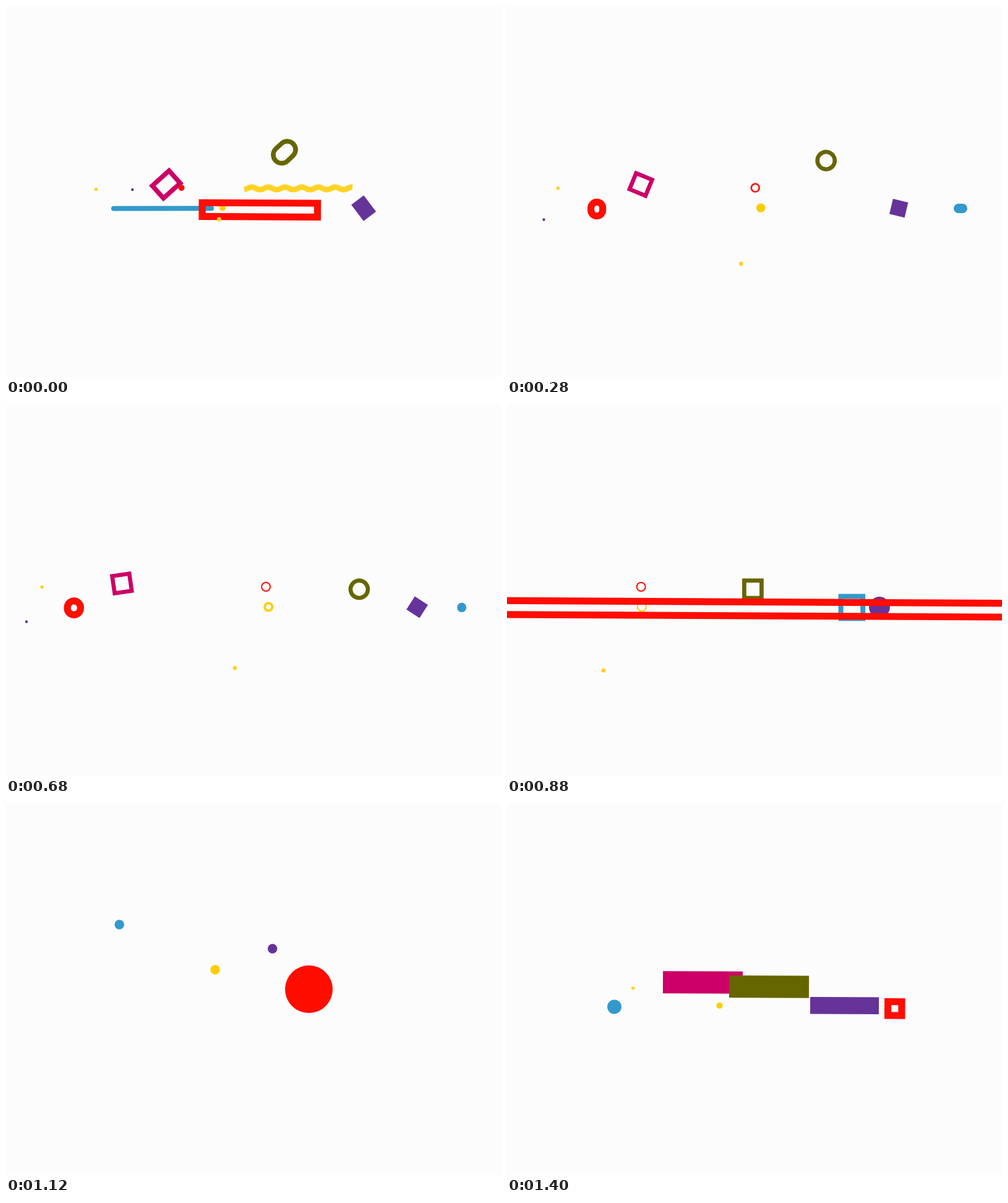
Recreate the animation shown at these times as an HTML page with a canvas. Size 800 px wide and 600 px high, loop 1440 ms.

```html
<!DOCTYPE html>
<html lang="en">
<head>
<meta charset="utf-8">
<title>Shape relay</title>
<style>
  html, body { margin: 0; width: 100%; height: 100%; overflow: hidden; background: #fcfcfc; }
  canvas { display: block; }
</style>
</head>
<body>
<canvas id="stage" width="800" height="600"></canvas>
<script>
const ctx = document.getElementById('stage').getContext('2d');
const RED = '#ff0d00', BLUE = '#3399cc', PURPLE = '#663399', OLIVE = '#666600',
      MAGENTA = '#cc0066', YELLOW = '#ffcc00', LEMON = '#ffd326';

// Each loop gathers (before 0), drifts apart (from 0) and sweeps away (from SWEEP to END).
const LOOP = 1440, STEP = 40, LEAD = 320, SWEEP = 680, END = LOOP - LEAD;
const SOLID = 99;

const mix = (a, b, p) => a + (b - a) * p;
const linear = (t, from, to) => Math.min(1, Math.max(0, (t - from) / (to - from)));
const ramp = (t, from, to) => { const p = linear(t, from, to); return p * p * (3 - 2 * p); };
const easeOut = p => 1 - (1 - p) ** 2;

// Exponential approach to a goal that itself drifts, in pixels per second.
const glide = (t, first, goal, tau, drift = 0) =>
  goal + drift * t / 1000 + (first - goal) * Math.exp(-t / tau);

const gather = t => ramp(t, -LEAD, -60);
const grow = t => ramp(t, -160, -40);
const sweep = (t, power = 1.5) => linear(t, SWEEP, END) ** power;
const rise = t => linear(t, 900, END) ** 2;
const burst = t => Math.sin(Math.PI * linear(t, SWEEP, END)) ** 2;
const exit = t => 680 * sweep(t);

// A box with corners from square (round 0) to full (round 1) and an inner border.
function box(color, x, y, w, h, { angle = 0, round = 0, border = SOLID } = {}) {
  if (w < 0.3 || h < 0.3) return;
  const radius = round * Math.min(w, h) / 2;
  ctx.save();
  ctx.translate(x, y);
  ctx.rotate(angle * Math.PI / 180);
  ctx.beginPath();
  ctx.roundRect(-w / 2, -h / 2, w, h, radius);
  if (border * 2 < Math.min(w, h)) {
    ctx.roundRect(border - w / 2, border - h / 2, w - 2 * border, h - 2 * border,
      Math.max(0, radius - border));
  }
  ctx.fillStyle = color;
  ctx.fill('evenodd');
  ctx.restore();
}

const dot = (color, x, y, r, border) => box(color, x, y, 2 * r, 2 * r, { round: 1, border });

function wave(t) {
  const weight = 9 * (1 - t / 160);
  if (t < 0 || weight <= 0) return;
  const end = 560 - 1.42 * t;
  const y = x => 295 - 2 * Math.cos((x - 181) / 27 * 2 * Math.PI);
  ctx.beginPath();
  for (let x = 385 - 1.74 * t; x < end; x++) ctx.lineTo(x, y(x));
  ctx.lineTo(end, y(end));
  ctx.lineWidth = weight;
  ctx.strokeStyle = LEMON;
  ctx.stroke();
}

function yellow(t) {
  const border = 8 - 6 * linear(t, 200, 880) + 6 * ramp(t, 960, 1100);
  if (t < 0) {
    const g = gather(t);
    dot(YELLOW, mix(338, 343.5, g), mix(268, 326, g), mix(7.7, 5, g), border);
  } else {
    const x = mix(glide(t, 350, 422, 165, 5), 338, sweep(t)) - 185 * burst(t);
    dot(YELLOW, x, mix(326.5, 268, rise(t)), 5 + 3 * ramp(t, 0, 400), border);
  }
}

function blue(t) {
  const g = gather(t), s = sweep(t, 1.43), swell = 29 * burst(t);
  let left, right, h;
  if (t < 0) {
    left = mix(175.5, 162, g);
    right = mix(191, 185, g);
    h = right - left;
  } else {
    left = mix(mix(170, 729, ramp(t, 0, 300)), 175.5, s) - swell / 2;
    right = mix(mix(336, 744, easeOut(linear(t, 0, 215))), 191, s) + swell / 2;
    h = 8 + 7.4 * ramp(t, 120, 240) + swell;
  }
  const y = t < 0 ? mix(195, 328, g) : mix(327.4, 195, rise(t));
  const round = 1 - ramp(t, SWEEP, 800) + ramp(t, 940, 1060);
  box(BLUE, (left + right) / 2, y, right - left, h,
    { angle: -0.15, round, border: t < 120 ? SOLID : 8 });
}

function magenta(t) {
  if (t < 0) {
    box(MAGENTA, mix(370, 316.5, grow(t)), 288.5, 129 * grow(t), 36 * grow(t), { angle: 0.3 });
  } else {
    box(MAGENTA, glide(t, 259, 235.7, 71, -71) - exit(t), 288.6, glide(t, 44, 34.5, 40), 34.6,
      { angle: glide(t, -42, -142.7, 85, -67), border: glide(t, 7.6, 6.6, 60) });
  }
}

function olive(t) {
  if (t < 0) {
    box(OLIVE, mix(370, 423.5, grow(t)), 295.5, 129 * grow(t), 36 * grow(t), { angle: 0.3 });
    return;
  }
  const shrink = 1 - ramp(t, 940, 1080);
  const y = 298 - 88.5 * Math.exp(-(((t - 122) / 202) ** 2));
  box(OLIVE, glide(t, 450, 633, 630) - 621 * sweep(t), y,
    glide(t, 47, 34.7, 30) * shrink, 34.8 * shrink, {
      angle: t < SWEEP ? -43 : 0,
      round: 1 - ramp(t, SWEEP, 840),
      border: glide(t, 7.6, 6.7, 60)
    });
}

function purple(t) {
  const g = gather(t);
  if (t < 0) {
    box(PURPLE, mix(430.7, 545.5, g), mix(234, 326, g), mix(15.4, 111, g), mix(15.4, 27.5, g),
      { angle: 0.3 * g, round: 1 - g });
    return;
  }
  const x = mix(mix(578, 664.6, easeOut(linear(t, 0, 704))), 430.7, sweep(t, 1.67));
  const resize = size => mix(size, 15.4, sweep(t)) + 12 * burst(t);
  box(PURPLE, x, mix(327, 234, rise(t)), resize(glide(t, 33, 25.2, 40)), resize(25.2),
    { angle: glide(t, 53, 90, 30, 48), round: ramp(t, SWEEP, 840) });
}

function red(t) {
  const g = gather(t), s = sweep(t), stretch = 700 * burst(t);
  let left, right;
  if (t < 0) {
    left = mix(451, 610, g);
    right = mix(528, 643.5, g);
  } else {
    const wobble = 194.5 * Math.exp(-t / 130) * Math.cos(t / 43.5);
    left = mix(117 - 0.033 * t + wobble, 451, s) - stretch;
    right = mix(glide(t, 509, 146, 101, -30), 528, s) + stretch;
  }
  const x = (left + right) / 2;
  const ball = 1 - g + rise(t);
  const round = 1 - g + ramp(t, 120, 280) - ramp(t, SWEEP, 800) + ramp(t, 960, 1060);
  box(RED, x, mix(327.6 + 0.0052 * x, 299.6, ball), right - left, mix(33.6, 77, ball),
    { angle: 0.3, round, border: mix(11.2, 39, ball) });
}

function specks(t) {
  if (t < 0) {
    dot(LEMON, mix(280, 203.7, grow(t)), 298, 2.8 * grow(t));
    return;
  }
  const out = exit(t);
  dot(RED, glide(t, 283.5, 404, 110, 24) - out, 294, glide(t, 5, 8, 110), 8 - 6 * ramp(t, 120, 320));
  dot(PURPLE, glide(t, 204.3, 78, 28, -66) - out, glide(t, 297, 342, 40, 12.5), 2.2);
  dot(LEMON, glide(t, 145.5, 99, 40, -60) - out, glide(t, 296.5, 294.5, 120), 2.8);
  dot(LEMON, glide(t, 344.3, 389, 101, -28) - out, glide(t, 345, 411.7, 57, 20), 3.4);
}

const scene = [wave, yellow, blue, magenta, olive, purple, red, specks];

function render(now) {
  const time = Math.floor(now / STEP) * STEP;
  const t = (time + LEAD) % LOOP - LEAD;
  ctx.fillStyle = '#fcfcfc';
  ctx.fillRect(0, 0, 800, 600);
  scene.forEach(draw => draw(t));
}

let start;
function tick(now) {
  start ??= now;
  render(now - start);
  requestAnimationFrame(tick);
}
render(0);
requestAnimationFrame(tick);
</script>
</body>
</html>
```
